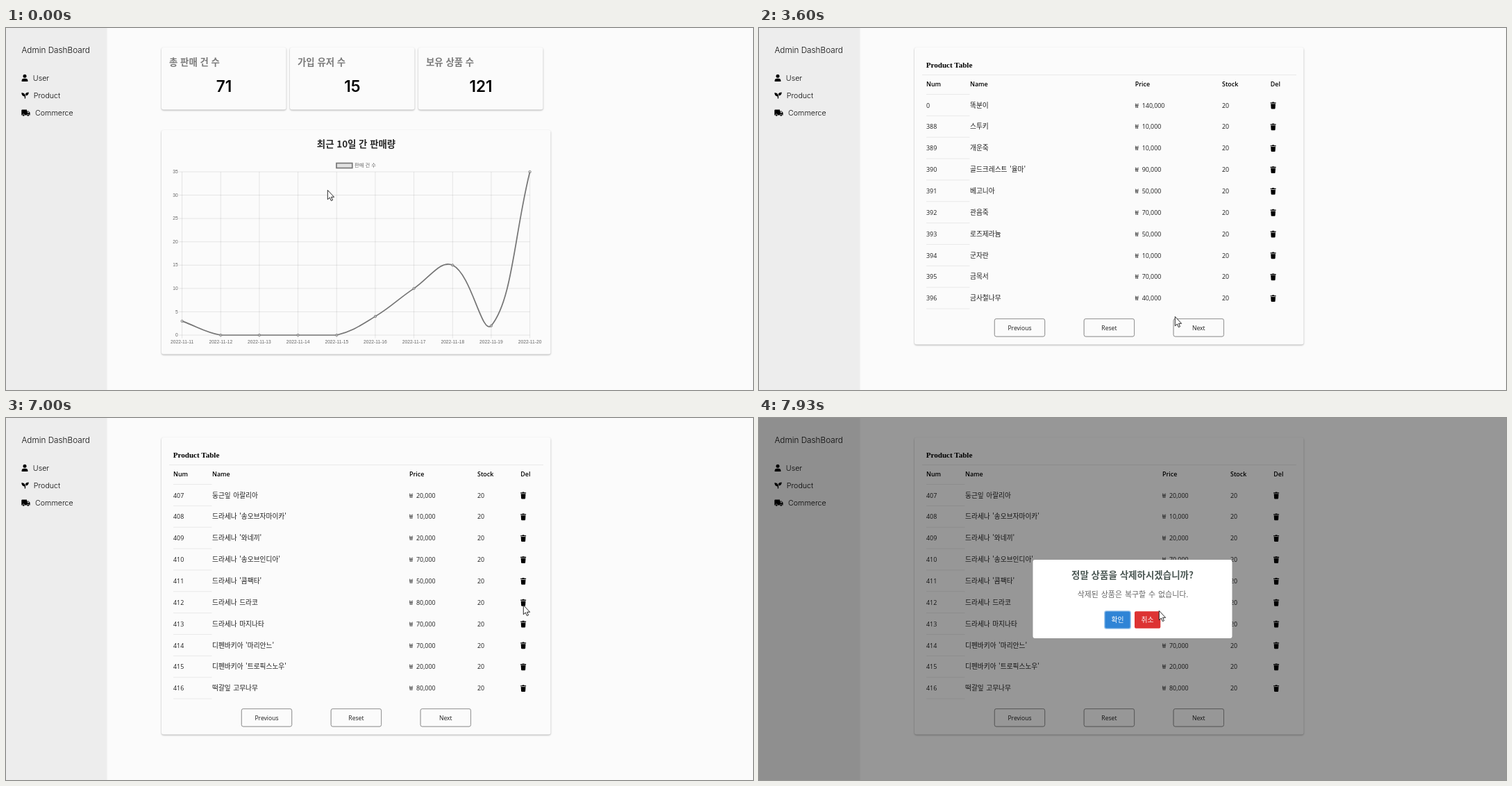
Recreate the animation shown at these times as an HTML page. Size 1076 px wide and 521 px high, loop 8 s.

```html
<!DOCTYPE html>
<html lang="ko">
<head>
<meta charset="utf-8">
<title>Admin DashBoard</title>
<style>
  html, body { margin: 0; width: 100%; height: 100%; overflow: hidden; background: #fbfbfb; }
  svg { display: block; width: 100%; height: 100%; }
  text { fill: #1c1c1c; font: 8.9px 'Open Sans', 'Noto Sans CJK KR', 'Noto Sans CJK', sans-serif; }
  .mid { text-anchor: middle; }
  .end { text-anchor: end; }
  .brand { font: 350 11.75px Inter, sans-serif; fill: #0a0a0a; }
  .menu { font: 350 10.7px Inter, sans-serif; fill: #0a0a0a; }
  .label, .title, .ask, .note, .legend, .name, .choice { font-family: 'Noto Sans CJK KR', 'Noto Sans CJK', sans-serif; }
  .label { font-size: 13.4px; font-weight: 700; fill: #7b7b7b; }
  .title { font-size: 13.4px; font-weight: 700; fill: #252525; }
  .count { font: 600 22.5px Inter, sans-serif; fill: #000; }
  .legend { font-size: 7.3px; fill: #666; }
  .tick { font: 6.7px 'Liberation Sans', sans-serif; fill: #666; }
  .heading { font: 700 11.1px 'Liberation Serif', serif; fill: #000; }
  .head { font-weight: 600; fill: #000; }
  .name { font-size: 9.7px; word-spacing: .08em; }
  .button { font-size: 8.6px; }
  .ask { font-size: 13.5px; font-weight: 700; fill: #4b5753; }
  .note { font-size: 10.95px; word-spacing: .08em; fill: #666; }
  .choice { font-size: 9.8px; font-weight: 500; fill: #fff; }
  .card { fill: #fbfbfb; filter: drop-shadow(0 1.5px 1.2px rgba(0,0,0,.3)); }
  .side { fill: #ededed; filter: drop-shadow(1px 0 1px rgba(0,0,0,.08)); }
  .push { fill: #fbfbfb; stroke: #8a8a8a; stroke-width: .9; filter: drop-shadow(0 .6px .4px rgba(0,0,0,.25)); }
  .rule { stroke: #e9e9e9; stroke-width: 1; }
  .pointer { fill: #fff; stroke: #111; stroke-width: .9; stroke-linejoin: round; }
  #modal { transform-origin: 538px 260.5px; }
</style>
</head>
<body>
<svg id="stage" viewBox="0 0 1076 521">
  <defs>
    <g id="trash">
      <path d="M0 .9H2.3L2.8 .2H5.2L5.7 .9H8V2.2H0Z"/>
      <path d="M.6 2.9H7.4L7 9Q6.9 10 6 10H2Q1.1 10 1 9Z"/>
    </g>
  </defs>
</svg>
<script>
const FPS = 15, LOOP = 8000;

const text = (x, y, str, cls = '') => `<text x="${x}" y="${y}" class="${cls}">${str}</text>`;
const line = (x1, y1, x2, y2, extra = 'class="rule"') =>
  `<line x1="${x1}" y1="${y1}" x2="${x2}" y2="${y2}" ${extra}/>`;
const rect = (x, y, w, h, extra = '', r = 3) =>
  `<rect x="${x}" y="${y}" width="${w}" height="${h}" rx="${r}" ${extra}/>`;
const card = (x, y, w, h) => rect(x, y, w, h, 'class="card"');
const group = (id, body) => `<g id="${id}">${body}</g>`;

function sidebar() {
  return rect(0, -4, 144, 530, 'class="side"', 0) +
    text(22.5, 36, 'Admin DashBoard', 'brand') +
    '<circle cx="27" cy="69.3" r="2.5"/><path d="M22.6 77V76Q22.6 72.8 26 72.8H28Q31.4 72.8 31.4 76V77Z"/>' +
    text(38.8, 76, 'User', 'menu') +
    '<path d="M22.3 93.3Q27.2 93 28.1 98V101.6H26.8V98.4Q22.4 98.2 22.3 93.3ZM32.8 92.5Q32.6 97 28.7 97.4Q28.4 95.8 27.7 94.9Q29.2 92.5 32.8 92.5Z"/>' +
    text(39.7, 101, 'Product', 'menu') +
    '<path d="M23 117.6H30V119.4H32.4L34.6 121.7V125.4H22.3V118.3Z"/>' +
    '<path d="M31 120.3H32.1L33.5 121.9H31Z" fill="#ededed"/>' +
    [25.2, 31.8].map(x => `<circle cx="${x}" cy="125.5" r="1.6" stroke="#ededed" stroke-width=".6"/>`).join('') +
    text(42, 126, 'Commerce', 'menu');
}

// Smooth line: each point gets two handles along the chord of its neighbours.
function smoothPath(points, tension, top, bottom) {
  const cap = y => Math.min(bottom, Math.max(top, y));
  const handles = points.map((p, i) => {
    const a = points[i - 1] || p, b = points[i + 1] || p;
    const before = Math.hypot(p[0] - a[0], p[1] - a[1]), after = Math.hypot(b[0] - p[0], b[1] - p[1]);
    const at = d => {
      const k = tension * d / (before + after);
      return [p[0] + k * (b[0] - a[0]), cap(p[1] + k * (b[1] - a[1]))];
    };
    return { from: at(-before), to: at(after) };
  });
  return points.map((p, i) => i ? `C${handles[i - 1].to} ${handles[i].from} ${p}` : `M${p}`).join('');
}

function dashboard() {
  const left = 253.6, right = 754.6, top = 207, bottom = 442;
  const sales = [3, 0, 0, 0, 0, 4, 10, 15, 2, 35];
  const xAt = i => left + i * (right - left) / 9;
  const yAt = v => bottom - v * (bottom - top) / 35;
  const grid = 'stroke="#000" stroke-opacity=".1" stroke-width=".9"';
  const points = sales.map((v, i) => [xAt(i), yAt(v)]);
  let out = [['총 판매 건 수', 71], ['가입 유저 수', 15], ['보유 상품 수', 121]].map(([name, n], i) => {
    const x = 224 + i * 185;
    return card(x, 28, 179.5, 89.5) + text(x + 11, 54, name, 'label') + text(x + 90, 91.7, n, 'count mid');
  }).join('');
  out += card(224, 147, 560.5, 322.5) + text(504.5, 171.5, '최근 10일 간 판매량', 'title mid') +
    rect(476, 194.5, 22.8, 7, 'fill="#e1e1e1" stroke="#777" stroke-width="1.7"', 0) +
    text(502, 200.2, '판매 건 수', 'legend');
  for (let v = 0; v <= 35; v += 5)
    out += line(left - 4.5, yAt(v), right, yAt(v), grid) + text(247.8, yAt(v) + 2.2, v, 'tick end');
  sales.forEach((_, i) => {
    out += line(xAt(i), top, xAt(i), bottom + 4.5, grid) + text(xAt(i), 454.2, `2022-11-${11 + i}`, 'tick mid');
  });
  out += `<path d="${smoothPath(points, .4, top, bottom)}" fill="none" stroke="#757575" stroke-width="1.7"/>`;
  return out + points.map(([x, y]) =>
    `<circle cx="${x}" cy="${y}" r="1.7" fill="#ddd" fill-opacity=".5" stroke="#757575" stroke-width=".8"/>`).join('');
}

function productTable(columns, rows) {
  const [num, name, price, stock, del] = columns, step = 30.85;
  let out = card(224, 28, 560.5, 427.5) + text(240.7, 57.3, 'Product Table', 'heading') + line(235, 67.5, 774, 67.5);
  ['Num', 'Name', 'Price', 'Stock', 'Del'].forEach((h, i) => out += text(columns[i], 83.5, h, 'head'));
  for (let i = 0; i <= 10; i++) out += line(num, 95.5 + i * step, name - .5, 95.5 + i * step);
  rows.forEach(([id, label, thousands], i) => {
    const y = 114.6 + i * step;
    out += text(num, y, id) + text(name, y, label, 'name') +
      text(price, y, '₩') + text(price + 10, y, `${thousands},000`) +
      text(stock, y, 20) + `<use href="#trash" x="${del - .2}" y="${y - 8.2}"/>`;
  });
  ['Previous', 'Reset', 'Next'].forEach((label, i) => {
    const x = 339.3 + i * 128.9;
    out += rect(x, 418.6, 72.4, 25.4, `class="push ${label}"`, 2.5) + text(x + 36.2, 434.6, label, 'button mid');
  });
  return out;
}

function dialog() {
  return rect(394.5, 204, 287, 113, 'fill="#fff"') +
    text(538, 231.3, '정말 상품을 삭제하시겠습니까?', 'ask mid') +
    text(538.5, 258, '삭제된 상품은 복구할 수 없습니다.', 'note mid') +
    rect(497.2, 277.3, 38.6, 26.4, 'fill="#3085d6" fill-opacity=".5"') +
    rect(498.5, 278.5, 36, 24, 'fill="#2f84d6"', 2) + text(516.5, 294, '확인', 'choice mid') +
    rect(541, 278.3, 37.3, 24.5, 'fill="#dd3333"', 2) + text(559.6, 294, '취소', 'choice mid');
}

const numbered = (first, rows) => rows.map((row, i) => [first + i, ...row]);
const page1 = [[0, '똑분이', 140], ...numbered(388, [
  ['스투키', 10], ['개운죽', 10], ["골드크레스트 '율마'", 90], ['베고니아', 50], ['관음죽', 70],
  ['로즈제라늄', 50], ['군자란', 10], ['금목서', 70], ['금사철나무', 40]])];
const page2 = numbered(397, [
  ['금전수', 30], ['꽃기린', 10], ['남천', 50], ['녹보수', 60], ['대만고무나무', 40],
  ['더피고사리', 20], ['덕구리난', 70], ['데코라 고무나무', 80], ['돈나무', 20], ['동백나무', 50]]);
const page3 = numbered(407, [
  ['둥근잎 아랄리아', 20], ["드라세나 '송오브자마이카'", 10], ["드라세나 '와네끼'", 20],
  ["드라세나 '송오브인디아'", 70], ["드라세나 '콤팩타'", 50], ['드라세나 드라코', 80],
  ['드라세나 마지나타', 70], ["디펜바키아 '마리안느'", 70], ["디펜바키아 '트로픽스노우'", 20], ['떡갈잎 고무나무', 80]]);

const stage = document.getElementById('stage');
stage.innerHTML += sidebar() +
  group('dashboard', dashboard()) +
  group('empty', card(224, 28, 560.5, 16)) +
  group('page1', productTable([241, 304, 541.8, 667, 736.8], page1)) +
  group('page2', productTable([241, 306, 548, 662, 735], page2)) +
  group('page3', productTable([241, 297, 581, 679, 741.3], page3)) +
  rect(0, 0, 1076, 521, 'id="shade"', 0) +
  group('modal', dialog()) +
  `<g id="cursor" class="pointer">
    <path id="arrow" d="M.3 .4V13.8L3.3 11L5.4 15.6L7.5 14.7L5.5 10.3H9.6Z"/>
    <path id="hand" d="M-1.6 10.5V1.7Q-1.6 .3 -.3 .3T1.1 1.7V6.4Q2.4 5.3 3.4 6.9Q4.9 6 5.7 7.6Q7.9 7 8 9.3V12.6Q8 14.6 6.8 16.2V18.8H-1V16.8Q-2.6 15.2 -4.9 11.4Q-5.9 9.4 -4.2 9Q-3 8.8 -1.6 10.5ZM1.1 6.4V9.5M3.4 6.9V9.7M5.7 7.6V9.9"/>
  </g>`;

const byId = id => document.getElementById(id);
const show = (id, on) => byId(id).style.display = on ? '' : 'none';
const within = (step, ...spans) => spans.some(([a, b]) => step >= a && step < b);

function pausedAnimation(id, keyframes, duration) {
  const animation = byId(id).animate(keyframes, { duration, fill: 'both' });
  animation.pause();
  return animation;
}
const zoom = (s, offset) => ({ transform: `scale(${s})`, offset, easing: 'ease' });
const pop = pausedAnimation('modal', [zoom(.7, 0), zoom(1.05, .45), zoom(.95, .8), zoom(1, 1)], 300);
const dim = pausedAnimation('shade', [{ opacity: 0, easing: 'ease' }, { opacity: .4 }], 100);

const ease = {
  smooth: u => u * u * (3 - 2 * u),
  in: u => u ** 1.4,
  out: u => 1 - (1 - u) ** 2
};
// Cursor stops: step, x, y and the easing used to get there.
const stops = [
  [0, 463, 233], [7, 463, 233], [9, 456, 236, 'in'], [19, 63, 95], [29, 63, 95],
  [33, 350, 176, 'in'], [42, 539, 305, 'out'], [54, 599, 415], [55, 599, 415], [59, 603, 422],
  [71, 603, 422], [77, 610.5, 419], [83, 610.5, 419], [93, 745, 269], [112, 745, 269],
  [119, 576, 277], [120, 576, 277]
];
function cursorAt(step) {
  const i = Math.max(1, stops.findIndex(s => s[0] >= step));
  const [t0, x0, y0] = stops[i - 1], [t1, x1, y1, kind = 'smooth'] = stops[i];
  const u = ease[kind]((step - t0) / (t1 - t0));
  return [x0 + (x1 - x0) * u, y0 + (y1 - y0) * u];
}

function draw(ms) {
  const step = Math.min(119, Math.floor((ms + 4) * FPS / 1000));
  const time = step * 1000 / FPS;
  show('dashboard', step < 23);
  show('empty', within(step, [23, 25]));
  show('page1', within(step, [25, 62]));
  show('page2', within(step, [62, 81]));
  show('page3', step >= 81);
  const hover = within(step, [57, 85]);
  document.querySelectorAll('.Next').forEach(b => b.style.fill = hover ? '#ebebeb' : '');

  show('modal', step > 105);
  show('shade', step > 105);
  pop.currentTime = Math.max(0, time - 7016);
  dim.currentTime = Math.max(0, time - 7000);

  const hand = within(step, [18, 30], [57, 85], [92, 105]);
  show('hand', hand);
  show('arrow', !hand);
  byId('cursor').setAttribute('transform', `translate(${cursorAt(step)})`);
}

const start = performance.now();
function tick() {
  draw((performance.now() - start) % LOOP);
  requestAnimationFrame(tick);
}
tick();
</script>
</body>
</html>
```
